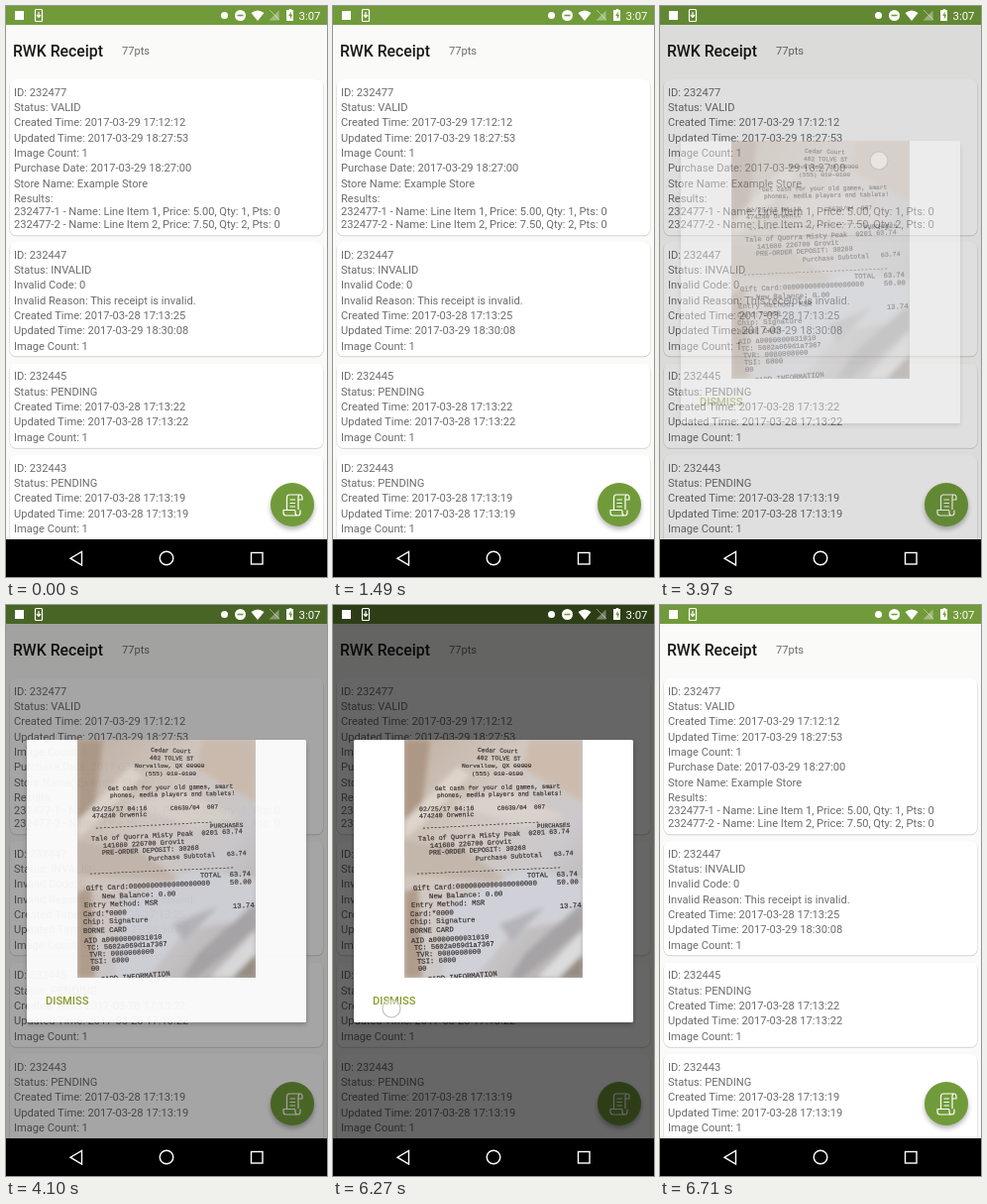
An HTML page that plays this animation: 324x576 px, repeating every 8000 ms.

```html
<!DOCTYPE html>
<html lang="en">
<head>
<meta charset="utf-8">
<title>Receipts</title>
<style>
  html, body { margin: 0; width: 100%; height: 100%; overflow: hidden; background: #000; }
  svg { display: block; width: 100%; height: 100%; }
  text { font-family: Roboto, sans-serif; font-size: 11.12px; fill: #6c6c6c; white-space: pre; }
  .title { font-size: 15.8px; font-weight: 500; fill: #191919; }
  .clock { font-size: 11.4px; fill: #fff; }
  .dismiss { font-weight: 500; fill: #8b9a2c; }
  .bar { fill: #719b3a; }
  .card { fill: #fff; }
  .shadow { fill: none; stroke: #d2d2d0; stroke-width: 1; }
  .line { fill: none; stroke: #fff; stroke-width: 1.2; stroke-linejoin: round; }
  .print text { font-family: "Liberation Mono", monospace; fill: #393434; stroke: #393434; stroke-width: .2; }
  .touch { fill: #fff; fill-opacity: .45; stroke: #c4c4c4; stroke-width: 1.2; }
  #scrim, #dialog, .touch { opacity: 0; }
</style>
</head>
<body>
<svg viewBox="0 0 324 576" preserveAspectRatio="none">
  <defs>
    <linearGradient id="paper" x1="0" y1="0" x2="1" y2="1">
      <stop offset="0" stop-color="#c0b0a2"/>
      <stop offset=".35" stop-color="#d2c8c0"/>
      <stop offset=".65" stop-color="#cbc9cc"/>
      <stop offset="1" stop-color="#b0aba9"/>
    </linearGradient>
    <clipPath id="photoClip"><rect x="72" y="136" width="180" height="240"/></clipPath>
    <clipPath id="screenClip"><rect width="324" height="538"/></clipPath>
    <filter id="soft" x="-30%" y="-30%" width="160%" height="160%"><feGaussianBlur stdDeviation="2.5"/></filter>
  </defs>

  <g clip-path="url(#screenClip)">
    <rect width="324" height="538" fill="#fafaf8"/>
    <rect class="bar" width="324" height="19"/>

    <text class="title" x="7" y="51">RWK Receipt</text>
    <text x="117" y="49">77pts</text>
    <g id="cards"></g>

    <circle cx="289" cy="506" r="22" opacity=".3" filter="url(#soft)"/>
    <circle class="bar" cx="289" cy="503" r="22"/>
    <path class="line" stroke-width="1" transform="translate(578) scale(-1 1)" d="M283 508V496q0-3-2-3t-2 3v2h4M281 493h11q2.500 0 2.500 3v13M286 509v2q0 3-2.500 3t-2.500-3v-2.500M286 508.500h12v2.500q0 3-2.500 3h-12M286 498h5.500M286 501.500h5.500M286 505h5.500"/>
    <rect id="scrim" width="324" height="538"/>

    <g id="status">
      <rect x="9" y="5" width="9" height="9" fill="#fff"/>
      <rect class="line" x="29.500" y="3.500" width="7" height="12" rx="1"/>
      <path class="line" d="M33 6v5M31 9l2 2.400L35 9"/>
      <circle cx="220.500" cy="9.500" r="3.500" fill="#fff"/>
      <circle cx="236.500" cy="9.500" r="5.500" fill="#fff"/>
      <path d="M233.500 9.500h6" stroke="#719b3a" stroke-width="1.600"/>
      <path d="M247.500 7Q254 2 260.500 7L254 15Z" fill="#fff"/>
      <path d="M275.500 4.500v10h-10Z" fill="#fff" opacity=".35"/>
      <path d="M266 4l10 10" stroke="#fff" opacity=".45"/>
      <path d="M283 4h1.300V3h2.400v1h1.800v11h-7V4Z" transform="translate(1.500)" fill="#fff"/>
      <path d="M287.600 5.500l-2.300 4.500h1.500v3.500l2.400-4.800h-1.600Z" fill="#719b3a"/>
      <text class="clock" x="295.500" y="13.500">3:07</text>
    </g>
  </g>

  <g fill="none" stroke="#fff" stroke-width="1.400">
    <rect y="538" width="324" height="38" fill="#000" stroke="none"/>
    <path d="M76.500 550.500v13.500L65 557.200Z"/>
    <circle cx="162" cy="557" r="6.800"/>
    <rect x="247.500" y="551.500" width="11.500" height="11.500"/>
  </g>

  <g id="dialog">
    <rect x="21" y="139" width="282" height="284" opacity=".25" filter="url(#soft)"/>
    <rect x="21" y="136" width="282" height="285" rx="1.500" fill="#fff"/>
    <g clip-path="url(#photoClip)">
      <rect x="72" y="136" width="180" height="240" fill="url(#paper)"/>
      <g filter="url(#soft)">
        <path d="M72 136h26l-8 64-18 30Z" fill="#ad9886"/>
        <path d="M198 136h54v62l-28-14-32-20Z" fill="#cdbcae"/>
        <path d="M72 218l54-56 12 10-48 50-18 14Z" fill="#ded4cb"/>
        <path d="M120 200l60-12 54 26-42 10Z" fill="#d9d1cb"/>
        <path d="M72 238l60 8 48 34-108-8Z" fill="#c3b6ab"/>
        <path d="M72 290l14-6 4 92H72Z" fill="#b09c8a"/>
        <path d="M120 300l70-32 62 8v40l-70 12-40 48h-32Z" fill="#d0d1d8"/>
        <path d="M252 300l-58 52-16 24h14l60-50Z" fill="#a5a3a5"/>
        <path d="M252 328l-46 48h24l22-22Z" fill="#dcdbdd"/>
        <path d="M252 352l-24 24h24Z" fill="#968b82"/>
        <path d="M168 322l46-18-34 36Z" fill="#b4b4ba"/>
      </g>
      <g id="print" class="print"></g>
    </g>
    <text class="dismiss" x="40" y="402.500">DISMISS</text>
  </g>

  <circle class="touch" id="tapCard" cx="221" cy="156" r="9"/>
  <circle class="touch" id="tapDismiss" cx="59" cy="407" r="9"/>
</svg>

<script>
const LOOP = 8000;
const byId = id => document.getElementById(id);

function add(parent, tag, attrs, content = '') {
  const node = document.createElementNS('http://www.w3.org/2000/svg', tag);
  for (const key in attrs) node.setAttribute(key, attrs[key]);
  node.textContent = content;
  parent.append(node);
}

const captured = (day, time, updated) => [
  `Created Time: 2017-03-${day} ${time}`,
  `Updated Time: 2017-03-${updated}`,
  'Image Count: 1'
];

const cards = [
  { y: 74, h: 157, lines: ['ID: 232477', 'Status: VALID', ...captured(29, '17:12:12', '29 18:27:53'),
    'Purchase Date: 2017-03-29 18:27:00', 'Store Name: Example Store', 'Results:'],
    items: ['232477-1 - Name: Line Item 1, Price: 5.00, Qty: 1, Pts: 0',
      '232477-2 - Name: Line Item 2, Price: 7.50, Qty: 2, Pts: 0'] },
  { y: 238, h: 115, lines: ['ID: 232447', 'Status: INVALID', 'Invalid Code: 0',
    'Invalid Reason: This receipt is invalid.', ...captured(28, '17:13:25', '29 18:30:08')] },
  { y: 360.5, h: 85, lines: ['ID: 232445', 'Status: PENDING', ...captured(28, '17:13:22', '28 17:13:22')] },
  { y: 453, h: 92, lines: ['ID: 232443', 'Status: PENDING', ...captured(28, '17:13:19', '28 17:13:19')] }
];

for (const { y, h, lines, items = [] } of cards) {
  const box = { x: 4, width: 316, height: h, rx: 6 };
  add(byId('cards'), 'rect', { ...box, y: y + 0.8, class: 'shadow' });
  add(byId('cards'), 'rect', { ...box, y, class: 'card' });
  lines.forEach((line, i) => add(byId('cards'), 'text', { x: 8, y: y + 16.8 + i * 15.3 }, line));
  items.forEach((line, i) => add(byId('cards'), 'text', { x: 8, y: y + 136.7 + i * 12.9 }, line));
}

// Printed lines: text, x, baseline, font size, tilt in degrees
const print = [
  ['Cedar Court', 146, 148, 6.2, 2],
  ['402 TOLVE ST', 145, 156, 6.2, 1],
  ['Norvallow, QX 00000', 130, 164, 6.2, 0],
  ['(555) 010-0100', 140, 172, 6.2, 0],
  ['Get cash for your old games, smart', 103, 187, 6.2, -1],
  ['phones, media players and tablets!', 105, 194, 6.2, -1],
  ['02/25/17 04:16', 87, 208, 6.6, -1],
  ['C0639/04  007', 166, 207, 6.2, -2],
  ['474240 Orwenic', 87, 215, 6.6, -2],
  ['-'.repeat(30), 90, 227, 6.6, -3],
  ['PURCHASES', 206, 225, 6.2, -2],
  ['Tale of Quorra Misty Peak  0201 63.74', 86, 238, 6.9, -3],
  ['141680 226700 Grovit', 98, 245, 6.9, -3],
  ['PRE-ORDER DEPOSIT: 30268', 97, 252, 6.8, -3],
  ['Purchase Subtotal   63.74', 144, 258, 6.6, -3.5],
  ['-'.repeat(37), 84, 273, 6.6, -2.5],
  ['TOTAL  63.74', 196, 275, 7.1, -2],
  ['Gift Card:0000000000000000000', 81, 288, 7.2, -2.5],
  ['50.00', 226, 282, 7.3, -2],
  ['New Balance: 0.00', 97, 296, 7.3, -2],
  ['Entry Method: MSR', 79, 305, 7.3, -2],
  ['13.74', 229, 306, 7.3, -3],
  ['Card:*0000', 78, 314, 7.3, -2],
  ['Chip: Signature', 78, 322, 7.3, -2],
  ['BORNE CARD', 78, 331, 7.3, -2],
  ['AID a0000000031010', 79, 341, 7.3, -3],
  ['TC: 5602a069d1a7367', 82, 348, 7.1, -3],
  ['TVR: 0080008000', 84, 355, 7.3, -3],
  ['TSI: 6800', 85, 362, 7.3, -3],
  ['00', 86, 369, 7.3, -3],
  ['CARD INFORMATION', 96, 380, 7.3, -5]
];
for (const [line, x, y, size, tilt] of print)
  add(byId('print'), 'text', { x, y, transform: `rotate(${tilt} ${x} ${y})`, style: `font-size:${size}px` }, line);

// Steps: [time in ms, opacity, easing towards the next step]
function fade(id, steps) {
  const frames = [[0, 0], ...steps, [LOOP, 0]].map(([time, opacity, easing = 'linear']) =>
    ({ offset: time / LOOP, opacity, easing }));
  byId(id).animate(frames, { duration: LOOP, iterations: Infinity });
}

fade('tapCard', [[3660, 0], [3660, 1], [4000, 1], [4000, 0]]);
fade('scrim', [[3900, 0], [4240, .6], [6440, .6], [6680, 0]]);
fade('dialog', [[3900, 0, 'ease-out'], [4150, 1], [6440, 1], [6650, 0]]);
fade('tapDismiss', [[6270, 0], [6270, 1], [6400, 1], [6400, 0]]);
</script>
</body>
</html>
```
